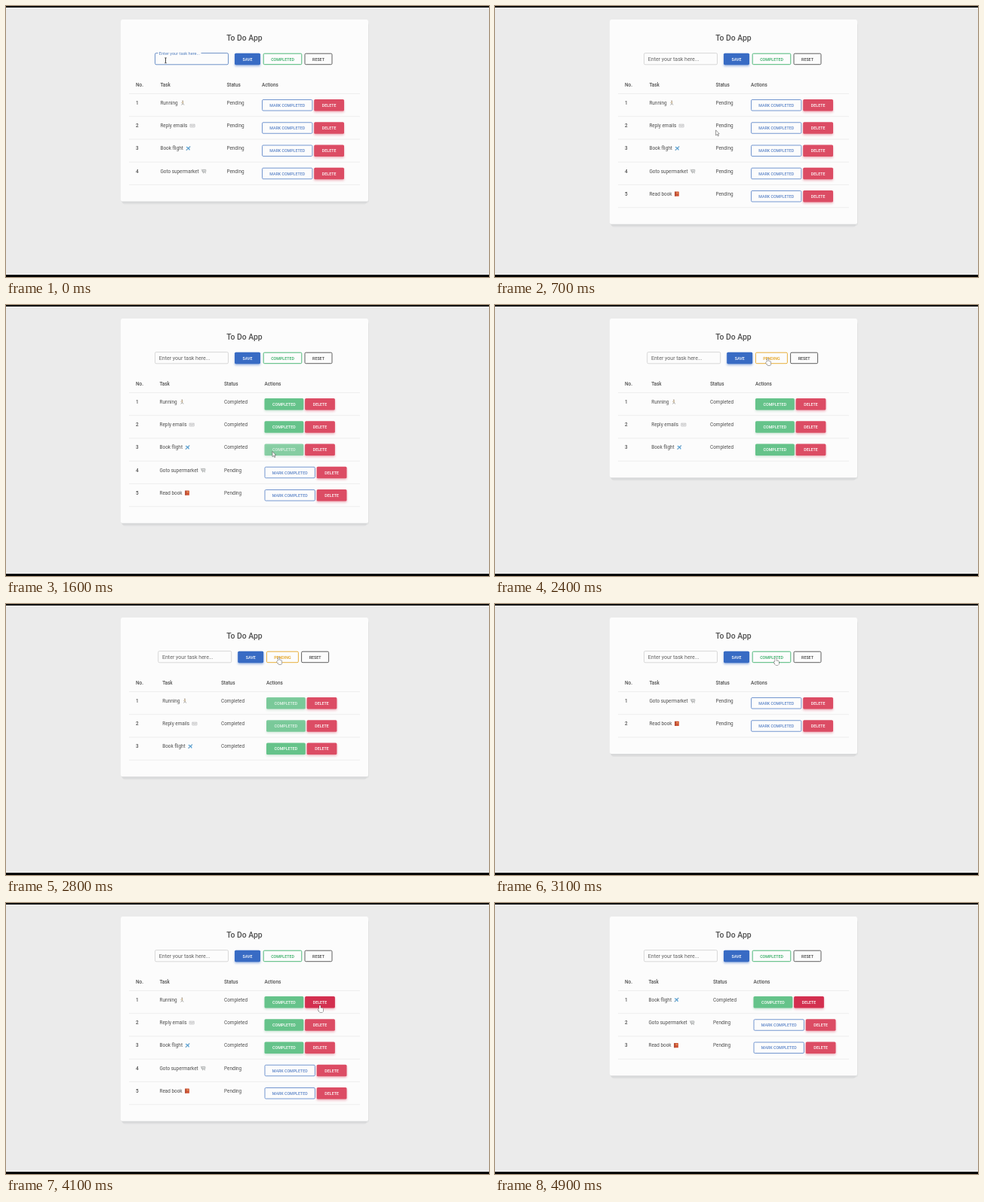
Write an HTML page with a canvas that moves like this. It is 640 px wide and 360 px high and loops after 5000 ms.

```html
<!DOCTYPE html>
<html lang="en">
<head>
<meta charset="utf-8">
<title>To Do App</title>
<style>
html, body { margin: 0; width: 640px; height: 360px; overflow: hidden; background: #ebebeb; }
canvas { display: block; width: 640px; height: 360px; }
</style>
</head>
<body>
<canvas id="stage" width="640" height="360"></canvas>
<script>
const ctx = document.getElementById('stage').getContext('2d');
const LOOP = 5000, STEP = 100, ROW = 30.25, BTN = 15.5, FORM_Y = 62.7;
const BLUE = '#386bc4', RED = '#dc4c64', RED_DARK = '#d32f4f', GREEN = '#65c38a';
const INK = '#4f4f4f', CARD = '#fcfcfc', HINT = 'Enter your task here...';

const all = [
  { name: 'Running', icon: runner },
  { name: 'Reply emails', icon: envelope },
  { name: 'Book flight', icon: plane },
  { name: 'Goto supermarket', icon: cart },
  { name: 'Read book', icon: redBook }
];

// x of task, status and actions columns
const COLS = { pending: [204.4, 292.4, 339], mixed: [203.5, 289, 342.5], done: [207.2, 285, 345] };

const events = [
  [300, 'add'], [910, 'complete'], [1110, 'complete'], [1520, 'complete'],
  [2200, 'toggle'], [2500, 'toggle'], [2710, 'toggle'], [3100, 'toggle'],
  [3400, 'reset'], [4300, 'delete'], [4500, 'delete']
];

// pointer stops: arrival time, x, y
const stops = [
  [0, 211.5, 72], [300, 319, 71], [500, 265.5, 176], [900, 370, 133], [1100, 368, 162],
  [1400, 353, 194.5], [2100, 361.5, 71], [3300, 402, 74], [3900, 416, 136], [4800, 619, 122]
];
const MOVE = 300;

// runs the clicks through the app and keeps each resulting view
function play() {
  let tasks = all.slice(0, 4), done = 0, filter = '';
  const views = [];
  const push = (at, kind) => {
    const rows = filter === 'done' ? tasks.slice(0, done) : filter ? tasks.slice(done) : tasks;
    views.push({ at, kind, rows, done: filter === 'todo' ? 0 : done, filter, prev: views.at(-1) });
  };
  push(0, 'start');
  for (const [at, kind] of events) {
    if (kind === 'add') tasks = all;
    if (kind === 'complete') done++;
    if (kind === 'toggle') filter = filter === 'done' ? 'todo' : 'done';
    if (kind === 'reset') filter = '';
    if (kind === 'delete') { tasks = tasks.slice(1); done--; }
    push(at, kind);
  }
  return views;
}
const views = play();

function pointer(t) {
  const i = stops.findIndex(s => s[0] >= t);
  if (i < 0) return null;
  const [b, u, v] = stops[i], [a, x, y] = stops[Math.max(0, i - 1)];
  const k = Math.max(0, 1 - (b - t) / Math.min(MOVE, b - a || 1));
  const e = k * k * (3 - 2 * k);
  return { x: x + (u - x) * e, y: y + (v - y) * e };
}

function text(s, x, mid, size, weight = 400, color = INK, align = 'left') {
  ctx.font = `${weight} ${size}px Roboto, Arial, sans-serif`;
  ctx.fillStyle = color;
  ctx.textAlign = align;
  ctx.fillText(s, x, mid + size * 0.355);
  return ctx.measureText(s).width;
}

function box(x, y, w, h, r, fill, edge) {
  ctx.beginPath();
  ctx.roundRect(x, y, w, h, r);
  if (fill) { ctx.fillStyle = fill; ctx.fill(); }
  if (edge) { ctx.strokeStyle = edge; ctx.lineWidth = 0.85; ctx.stroke(); }
}

function line(color, width, ...pts) {
  ctx.strokeStyle = color;
  ctx.lineWidth = width;
  ctx.beginPath();
  for (const [x, y] of pts) ctx.lineTo(x, y);
  ctx.stroke();
}

function solid(x, y, w, label, fill, glow) {
  ctx.save();
  ctx.shadowColor = glow;
  ctx.shadowBlur = 3;
  ctx.shadowOffsetY = 1.8;
  box(x, y, w, BTN, 1.6, fill);
  ctx.restore();
  text(label, x + w / 2, y + 8, 5.3, 500, '#fff', 'center');
}

function outline(x, y, w, label, color) {
  box(x + 0.5, y + 0.5, w - 1, BTN - 1, 1.4, null, color);
  text(label, x + w / 2, y + 8, 5.3, 500, color, 'center');
}

// icons fit a 6 px box centred on the origin
function runner() {
  box(-0.7, -3, 1.5, 1.5, 0.8, '#8d7b66');
  line('#d3b27a', 1.1, [0, -1.5], [0.3, 0.8]);
  line('#b3a792', 0.6, [-2, 0], [1.4, -0.5]);
  line('#8b8984', 0.8, [-1.5, 2.9], [0.3, 0.8], [1.8, 2.9]);
}

function envelope() {
  box(-3, -1.8, 6.4, 4, 0.4, '#e2e2e2', '#cfcfd1');
  line('#b8b8bb', 0.5, [-2.8, -1.5], [0.2, 0.6], [3.2, -1.5]);
}

function plane() {
  line('#79a9cb', 1.4, [-2.6, 2.6], [2.8, -2.6]);
  line('#4f9fd6', 1.2, [-2.4, -1.9], [0.4, -0.4], [2, 2.3]);
}

function cart() {
  box(-1.8, -2, 4.6, 2.8, 0.4, '#d8d9d9', '#b2b5b5');
  line('#a2a5a5', 0.6, [-3, -2.6], [-1.2, 1.6], [2.6, 1.6]);
  for (const x of [-1, 1.6]) box(x, 2, 1, 1, 0.5, '#8c8c8c');
}

function redBook() {
  box(-2.8, -3.1, 5.6, 6.3, 0.6, '#cf5638');
  box(-2.8, -3.1, 1.2, 6.3, 0.5, '#a8432f');
  box(-0.6, -1.8, 2.3, 1.4, 0.2, '#e59a5a');
}

function label(task, x, mid, size) {
  const w = text(task.name, x, mid, size);
  ctx.save();
  ctx.translate(x + w + size + 0.1, mid);
  task.icon();
  ctx.restore();
}

function form(t, x, filtered) {
  const focus = t < 300;
  box(x + 0.5, 62.6, 97, 15.2, 1.6, null, focus ? '#5580c0' : '#d2d2d2');
  if (focus) {
    box(x + 4.5, 61, 57, 3, 0, CARD);
    text(HINT, x + 5.8, 62.6, 5.65, 400, '#5580c0');
    const typed = all[4].name.slice(0, t / 20);
    if (t < 200) text(typed, x + 5.8, 70.6, 7.03);
    else label(all[4], x + 5.8, 70.6, 7.03);
  } else text(HINT, x + 5.8, 70.6, 7.03, 400, '#626262');

  const w = filtered ? 43 : 51.6;
  solid(x + 106, FORM_Y, 34, 'SAVE', BLUE, 'rgba(56,107,196,.45)');
  outline(x + 143.7, FORM_Y, w, filtered ? 'PENDING' : 'COMPLETED', filtered ? '#e4a11b' : '#2fab60');
  outline(x + w + 146.9, FORM_Y, 37, 'RESET', '#444');
}

// green fades in over a button that was an outline before
function doneButton(x, y, p) {
  if (p < 0.1) return text('COMPLETED', x + 25.9, y + 8, 5.3, 500, '#83a7d6', 'center');
  ctx.globalAlpha = p;
  solid(x, y, 51.8, 'COMPLETED', GREEN, 'rgba(40,140,80,.2)');
  ctx.globalAlpha = 1;
}

const inside = (p, x, y, w) => p && p.x >= x && p.x <= x + w && p.y >= y && p.y <= y + BTN;

// draws the rows and tells whether the pointer is on a button
function table(t, view, cols, p) {
  const { rows, done, prev } = view, [task, status, act] = cols;
  let hot = false;
  [['No.', 172], ['Task', task], ['Status', status], ['Actions', act]]
    .forEach(([s, x]) => text(s, x, 104.4, 6.4, 500));
  for (let i = 0; i <= rows.length; i++) box(163, 116 + i * ROW, 306, 1, 0, '#eee');

  rows.forEach((row, i) => {
    const mid = 128.6 + i * ROW, y = 124 + i * ROW, isDone = i < done;
    const w = isDone ? 51.8 : 67.4, del = act + w + 1.8;
    text(i + 1, 172, mid, 6.4, 500);
    label(row, task, mid, 6.4);
    text(isDone ? 'Completed' : 'Pending', status, mid, 6.4);
    if (isDone) {
      const reused = prev && i >= prev.done && i < prev.rows.length;
      doneButton(act, y, reused ? Math.min(1, (t - view.at) / 110) : 1);
    } else outline(act, y, w, 'MARK COMPLETED', '#5c85c8');

    const over = inside(p, del, y, 39.8);
    const dark = over || (i === 0 && view.kind === 'delete');
    solid(del, y, 39.8, 'DELETE', dark ? RED_DARK : RED, 'rgba(220,76,100,.4)');
    hot = hot || over || (!isDone && inside(p, act, y, w));
  });
  return hot;
}

function arrow() {
  ctx.beginPath();
  for (const [x, y] of [[0, 0], [0, 7], [1.7, 5.6], [2.8, 8], [3.8, 7.5], [2.8, 5.1], [4.6, 4.9]]) ctx.lineTo(x, y);
  ctx.closePath();
  ctx.fillStyle = '#fff';
  ctx.fill();
  ctx.strokeStyle = '#555';
  ctx.lineWidth = 0.6;
  ctx.stroke();
}

function hand() {
  const parts = edge => {
    box(-0.8, 0, 1.6, 6, 0.8, '#fff', edge);
    box(-2.4, 4.6, 2.2, 2.4, 0.8, '#fff', edge);
    box(-1, 3.6, 5, 5.6, 1.3, '#fff', edge);
  };
  parts('#333');
  parts();
}

function beam() {
  line('#333', 0.9, [0, -3], [0, 3.6]);
  for (const y of [-3.1, 3.7]) line('#333', 0.7, [-1.4, y], [1.4, y]);
}

function draw(t) {
  const view = views.findLast(v => v.at <= t);
  const { rows, done } = view;
  const mode = !done ? 'pending' : done === rows.length ? 'done' : 'mixed';
  const filtered = view.filter === 'done';
  const x = filtered ? 201.2 : 197;
  const p = pointer(t), h = 120.5 + rows.length * ROW;

  box(0, 0, 640, 360, 0, '#ebebeb');
  box(152.5, 22, 328.5, h - 1.5, 4, 'rgba(40,60,70,.05)');
  box(154, 24, 324, h - 2, 4, 'rgba(40,50,60,.05)');
  box(152, 18, 328, h, 2.5, CARD);

  text('To Do App', 316, 42.2, 10.4, 500, INK, 'center');
  form(t, x, filtered);
  const hot = table(t, view, COLS[mode], p) || inside(p, x + 106, FORM_Y, 130);

  if (p) {
    ctx.save();
    ctx.translate(p.x, p.y);
    if (inside(p, x, FORM_Y, 98)) beam();
    else if (hot) hand();
    else arrow();
    ctx.restore();
  }
  box(0, 0, 640, 2, 0, '#000');
  box(0, 357, 640, 3, 0, '#000');
}

const start = performance.now();
function tick() {
  const t = (performance.now() - start) % LOOP;
  draw(Math.floor(t / STEP) * STEP);
  requestAnimationFrame(tick);
}
tick();
</script>
</body>
</html>
```
